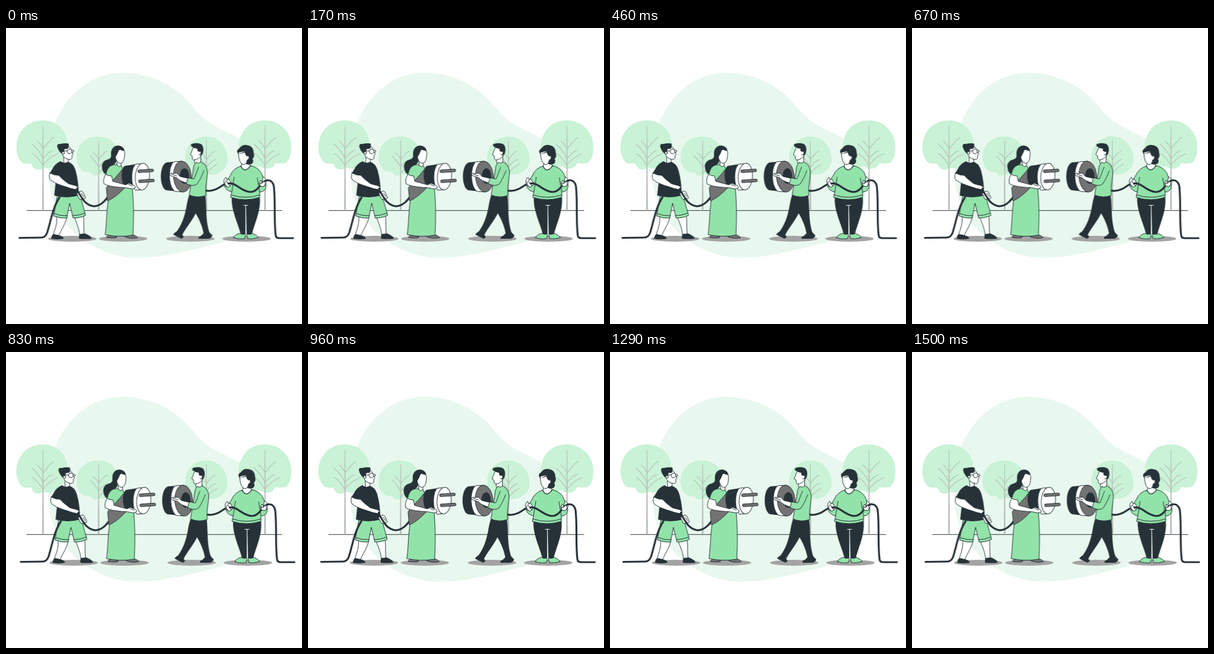
An HTML page that plays this animation: 500 px wide and 500 px high, repeating every 1540 ms.

```html
<!DOCTYPE html>
<html lang="en">
<head>
<meta charset="utf-8">
<title>Connecting the plug</title>
<style>
html, body { margin: 0; width: 100%; height: 100%; overflow: hidden; background: #fff; }
svg { display: block; width: 100%; height: 100%; }
path, ellipse, circle, rect { stroke-linecap: round; stroke-linejoin: round; }
.d { fill: #263238; }
.g { fill: #92e3a9; stroke: #263238; }
.w { fill: #fff; stroke: #263238; }
.s { fill: #737373; stroke: #263238; }
.l { fill: none; stroke: #263238; }
.cable { fill: none; stroke: #263238; stroke-width: 3.2; }
.shade { fill: #a3a3a3; }
.leaf { fill: #c9f2d6; }
.twig { fill: none; stroke: #b9c0bb; stroke-width: 1.2; }
.trunk { fill: #b9c0bb; }
#crew { animation: shake 1.5s linear infinite paused; }
@keyframes shake {
  10%, 90% { transform: translateX(-1px); }
  20%, 80% { transform: translateX(2px); }
  30%, 50%, 70% { transform: translateX(-4px); }
  40%, 60% { transform: translateX(4px); }
}
</style>
</head>
<body>
<svg viewBox="0 0 500 500">
  <path fill="#e9f8ee" d="M195 75.500C233 75 268 89 294 111C316 130 324 148 347 162C370 176 402 185 417 206C437 234 437 290 420 324C408 347 379 360 346 367C305 377 268 388 218 388C178 387 143 370 116 346C91 322 72 288 72 250C72 214 74 178 87 151C106 111 144 76 195 75.500Z"/>

  <!-- Trees -->
  <g>
    <path class="leaf" d="M28 228C15 217 14 190 26 174C42 151 79 150 96 172C110 191 103 218 88 229C83 237 73 239 64 236C55 243 45 238 43 229Q35 230 28 228Z"/>
    <path class="trunk" d="M62 165H63L64 307H61Z"/>
    <path class="twig" d="M62.500 205Q72 191 81 185M62.500 204Q58 195 53 191M62.500 221Q70 210 79 207M62.500 220Q55 205 44 196M62.500 232Q70 220 88 212M62.500 233Q56 220 45 212"/>
  </g>
  <g>
    <path class="leaf" d="M408 233C396 228 392 215 393 200C395 172 413 156 437 156C463 156 482 176 482 200C482 214 480 221 473 228Q461 230 455 228C450 240 435 240 428 233Q418 237 408 233Z"/>
    <path class="trunk" d="M437 165H438L439 307H436Z"/>
    <path class="twig" d="M437.500 205Q447 191 456 185M437.500 204Q433 195 427 191M437.500 221Q445 210 454 207M437.500 220Q430 205 419 196M437.500 232Q445 220 463 212M437.500 233Q431 220 420 212"/>
  </g>
  <g>
    <path class="leaf" d="M134 243C115 236 117 209 125 198C139 178 172 178 185 198C197 217 189 237 177 242Q170 250 158 247Q147 253 143 244Z"/>
    <path class="trunk" d="M156 190H157L158 307H155Z"/>
    <path class="twig" d="M156.500 223Q163 212 171 208M156.500 222Q153 214 147 211M156.500 236Q162 226 170 223M156.500 235Q150 223 142 216M156.500 246Q163 236 175 230"/>
  </g>
  <g>
    <path class="leaf" d="M315 243C300 234 300 210 309 198C324 178 353 178 367 198C379 216 376 236 362 243Q354 250 342 247Q331 252 325 244Z"/>
    <path class="trunk" d="M338 190H339L340 307H337Z"/>
    <path class="twig" d="M338.500 223Q345 212 353 208M338.500 222Q335 214 329 211M338.500 236Q345 225 354 222M338.500 235Q332 223 324 216M338.500 246Q345 236 357 230"/>
  </g>
  <path class="l" d="M35 308.300H466"/>

  <g transform="translate(.6 0)"><g id="crew">
    <ellipse class="shade" cx="111.500" cy="356" rx="41" ry="5"/>
    <ellipse class="shade" cx="197.500" cy="356" rx="41" ry="5"/>
    <ellipse class="shade" cx="311" cy="356" rx="41" ry="5"/>
    <ellipse class="shade" cx="406" cy="356" rx="41" ry="5"/>

    <!-- Man with glasses -->
    <path class="w" d="M85 316C87 330 82 340 79 350L88 352C93 340 101 330 103 317ZM114 317C119 330 123 338 124 350L132 349C130 338 132 329 130 315Z"/>
    <path class="d" d="M80 348Q76 350 76 356Q87 358 97 356Q97 352 89 350ZM124 348Q122 352 123 356Q134 357 144 356Q145 352 133 347Z"/>
    <path class="g" d="M86 284L80 317.500Q91 322 102 321L107 296L113 321Q125 321 134 316.500L124 281Z"/>
    <path class="l" d="M81 313.500Q92 318 103 317M112 317Q123 317 133 312.500"/>
    <path class="cable" d="M22.300 354.500L59 354Q66 354 69 346C75 328 78 304 90 286"/>
    <path class="cable" d="M117 270C126 281 129 298 147 301C165 302 174 280 186 266Q194 255 203 249"/>
    <path class="w" d="M97 216V228Q103 233 105 226L104 220Z"/>
    <path class="w" d="M94 204L105 200Q109 202 110 206L113 213L111 215Q112 222 108 222Q100 222 96 216Z"/>
    <path class="d" d="M86 200Q86 195 91 196Q98 194 105 195Q107 200 104 204L98.500 204.500L97.500 211L94 213Q88 208 86 200Z"/>
    <circle class="w" cx="96" cy="211" r="2.200"/>
    <path class="l" d="M97 208L104 207.500"/>
    <circle class="w" cx="107" cy="208.500" r="4"/>
    <circle class="w" cx="112" cy="208" r="1.800"/>
    <path class="d" d="M92 225Q82 229 78 238L73 246L84 255L81 283Q102 289 122 283Q123 262 117 240Q113 228 104 226Q98 230 92 225Z"/>
    <path class="w" d="M74 245Q71 253 75 257C84 264 98 267 109 271L118 273L119 270L122 271Q120 266 112 265L105 263C97 257 91 252 89 249Q81 249 74 245Z"/>
    <path class="w" d="M119 279Q123 279 126 275Q130 276 131 280L134 287Q132 290 129 287L127 290L124 289Z"/>
    <path class="l" d="M127 279L131 285M124 282L128 287"/>
    <path class="cable" d="M119 273L129 289"/>

    <!-- Woman in a sari -->
    <path class="s" d="M170 352Q173 348 180 350L187 353Q186 356 170 354ZM201 350L211 348Q220 351 222 354Q212 357 201 353Z"/>
    <path class="g" d="M174 281C169 305 170 330 167 349Q190 354 214 350C215 329 216 304 213 271L188 267Z"/>
    <path class="d" d="M190 199C180 199 177 206 177 214Q178 220 172 222C165 223 160 230 162 237Q163 247 171 247Q178 246 176 239Q178 232 184 229L188 220Z"/>
    <path class="g" d="M183 231Q174 231 170 241L168 248L178 252L177 270L193 263L196 246Q198 238 194 232Z"/>
    <path class="w" d="M187 222V231Q190 237 194 232V225Z"/>
    <path class="w" d="M184 209Q183 219 187 225Q191 231 196 227Q200 223 200 213Q201 208 196 204Z"/>
    <path class="d" d="M177 213Q177 199 190 198.500Q199 200 200 208Q194 207 191 205Q188 213 184 219L179 222Z"/>
    <path class="s" d="M195 240C187 251 175 261 169 270L171 292C184 287 194 276 205 265Z"/>

    <!-- Plug -->
    <path class="d" d="M219 230L200 233C193 237 193 262 201 267L219 272Z"/>
    <path class="w" d="M231 229L219 230C211 235 209 262 218 274L231 273Z"/>
    <ellipse class="w" cx="230" cy="251" rx="12" ry="22.500" transform="rotate(4 230 251)"/>
    <g transform="rotate(-4 236 250)">
      <rect class="s" x="223" y="239" width="26.500" height="4.500" rx="2.200"/>
      <rect class="s" x="223" y="256" width="26.500" height="4.500" rx="2.200"/>
    </g>
    <path class="w" d="M168 247Q163 256 165 263C172 268 190 269 203 270L213 272L218 270Q219 267 214 265L207 262L202 265L180 259L178 250Q172 250 168 247Z"/>
    <path class="l" d="M206 264L213 267"/>

    <!-- Socket -->
    <path class="d" d="M295 225L271 227C258 231 258 269 270 274L297 277Z"/>
    <path class="w" d="M297 225L283 226C273 234 273 268 285 276L298 277Z"/>
    <ellipse class="s" cx="297.500" cy="251" rx="15" ry="26" transform="rotate(-4 297.500 251)"/>
    <ellipse class="d" cx="301" cy="250" rx="8" ry="13"/>

    <!-- Man with the socket -->
    <path class="cable" d="M304 251C322 259 322 276 344 275C361 274 364 262 376 262"/>
    <path class="d" d="M309 282L336 282C339 300 336 327 344 347L334 351C332 336 326 323 320 313C315 324 303 338 297 350L287 345C297 332 301 318 304 304Q306 291 309 282Z"/>
    <path class="d" d="M287 344Q283 347 282 349L296 356L300 353L295 346ZM333 347Q330 351 325 353V356H342Q348 354 348 350L343 345Z"/>
    <path class="w" d="M318 215V228Q325 232 328 228L329 212Z"/>
    <path class="w" d="M316 202L313 209L311 214L314 216Q314 223 317 223Q326 222 330 214L330 203Z"/>
    <path class="d" d="M312 196.500Q319 193 329 196Q335 201 332 212L328 216L326 210Q326 208 323 208V204Q317 203 315 201Q312 201 312 196.500Z"/>
    <path class="w" d="M326 209Q329 207 329 211Q328 215 325 214"/>
    <path class="g" d="M321 227Q316 231 316 239L312 264L309 282Q322 288 337 283Q336 270 339 253Q343 233 329 226Q324 230 321 227Z"/>
    <path class="w" d="M276 248Q277 244 281 246L288 245Q291 249 294 251L307 254L305 262Q292 258 288 253L279 250Z"/>
    <path class="l" d="M279 247L288 250"/>
    <path class="g" d="M325 235C321 243 320 250 317 255L307 253L304 263Q317 269 323 263Q329 254 334 241"/>

    <!-- Woman holding the cable -->
    <path class="g" d="M384 354Q386 349 394 347L404 346Q405 352 402 356Q390 357 384 354ZM407 346L416 347Q424 350 426 354Q416 357 408 356Q405 351 407 346Z"/>
    <path class="d" d="M381 284H428C431 307 421 326 415 348Q410 350 406 348L405 303L404 348Q399 350 396 348C390 326 379 306 381 284Z"/>
    <path d="M404.500 347V300M401 299.500H408" fill="none" stroke="#fff"/>
    <path class="g" d="M397 233Q383 237 378 250L368 264Q369 274 381 277L379 286Q404 294 428 286L428 277Q438 277 439 266L431 245Q425 235 411 232Z"/>
    <path class="l" d="M385 252L381 277M424 253L428 277M380 282Q404 290 428 282"/>
    <path class="w" d="M398 225L397 234Q403 246 412 233L409 224Z"/>
    <path class="l" d="M396 234Q403 247 413 233"/>
    <path class="d" d="M392 213Q387 207 394 203Q399 196 408 198Q418 200 418 211Q420 217 416 221Q419 227 414 230Q408 232 404 229Z"/>
    <path class="w" d="M392 210L405 207Q406 214 409 215Q412 221 407 223Q406 230 401 231Q393 230 392 210Z"/>
    <path class="d" d="M391 212Q399 212 405 206L410 216L407 217Q403 214 403 210Q397 213 391 212Z"/>
    <path class="w" d="M368 263Q366 256 371 252L373 257L376 255L378 259L381 262L378 267L372 268ZM427 262L430 257L432 260L434 251L438 255Q441 260 437 266L430 267Z"/>
    <path class="cable" d="M371 264C386 257 395 276 412 277C427 277 430 258 441 257Q450 257 452 267C455 293 452 323 455 349Q455 355 461 355H484.500"/>
    <path class="w" d="M370 265Q368 260 372 258L375 264L378 266L375 269ZM429 262Q433 264 435 258L438 263L435 268L429 267Z"/>
  </g></g>
</svg>
<script>
const crew = document.getElementById('crew');
const LOOP = 1540, FPS = 24, LEAD = 30;

// Hold each pose for one step of a 24 fps clock.
function draw() {
  const t = performance.now() % LOOP;
  const step = Math.min(36, Math.floor(t * FPS / 1000 + 0.1));
  crew.style.animationDelay = -(step * 1000 / FPS + LEAD) + 'ms';
  requestAnimationFrame(draw);
}
draw();
</script>
</body>
</html>
```
